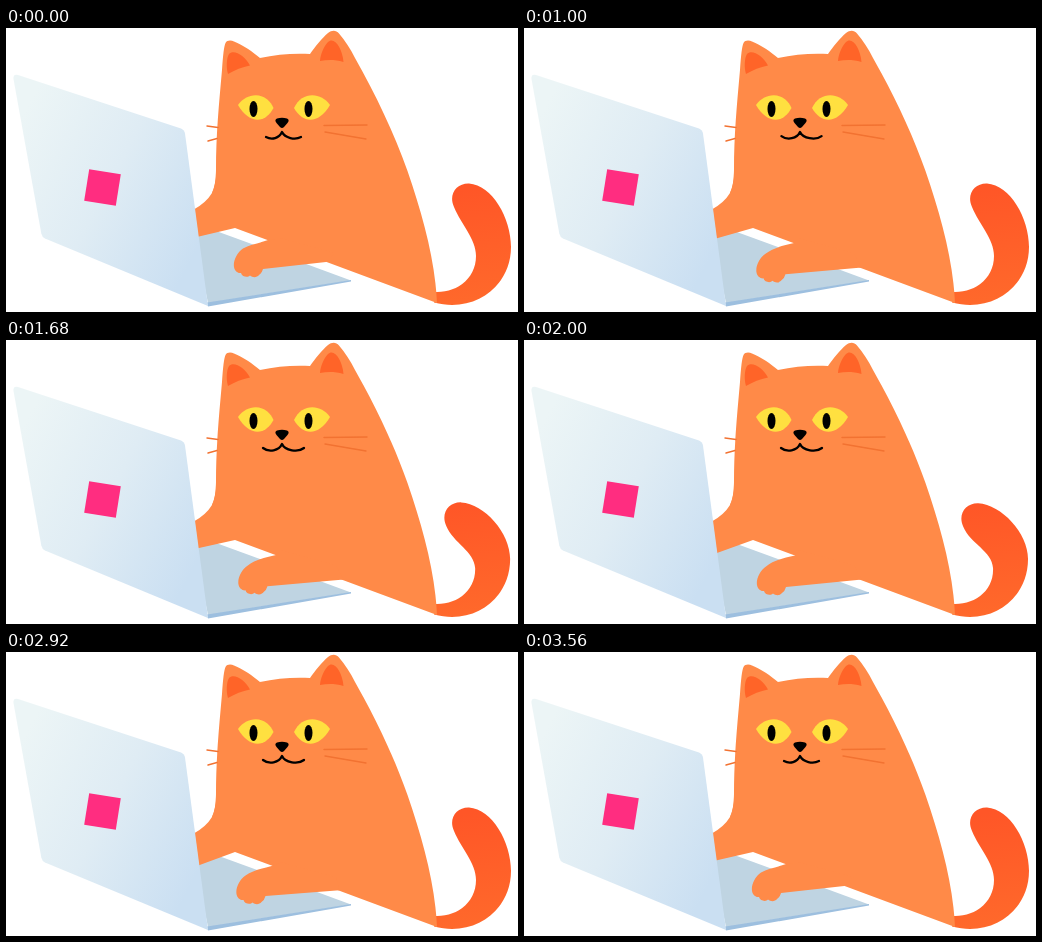
Write an HTML page that moves like this. It is 512 px wide and 284 px high and loops after 3.6 s.

```html
<!DOCTYPE html>
<html lang="en">
<head>
<meta charset="utf-8">
<title>Cat at a laptop</title>
<style>
  html, body { margin: 0; width: 100%; height: 100%; overflow: hidden; background: #fff; }
  svg { display: block; width: 100vw; height: 100vh; }
  .fur { fill: #ff8a48; }
  .ear { fill: #ff6428; }
  .eye { fill: #ffe040; }
  .line { fill: none; stroke-linecap: round; stroke-linejoin: round; }
</style>
</head>
<body>
<svg viewBox="0 0 512 284">
  <defs>
    <linearGradient id="lidFill" gradientUnits="userSpaceOnUse" x1="10" y1="100" x2="202" y2="200">
      <stop offset="0" stop-color="#ecf5f6"/>
      <stop offset=".5" stop-color="#dfecf4"/>
      <stop offset="1" stop-color="#cadff2"/>
    </linearGradient>
    <linearGradient id="tailFill" gradientUnits="userSpaceOnUse" x1="465" y1="160" x2="480" y2="275">
      <stop offset="0" stop-color="#ff5627"/>
      <stop offset="1" stop-color="#ff692b"/>
    </linearGradient>
  </defs>

  <path id="tail" fill="url(#tailFill)"/>

  <path class="fur" d="M210 142 C210 106 213 76 216 42 C217 27 218 18 219.500 15 C221 12 225 12 228 13.500
    C237 17 247 24 254 30 C270 26.500 288 25 304 26 C309 19 316 10 322 5 C326 2 330 2 333 5.500
    C339 12.500 344.500 21 349 30 C369.500 66 388.500 106 401.500 143 C416.500 187 429 231 431 275L229 200L205 190L206 165Q210 156 210 142Z"/>
  <path class="ear" d="M223 26 C228 21 239 28 244 37.500 C236 39 229 42 222 46 C220 39 220.500 30 223 26Z"/>
  <path class="ear" d="M322 14 C328 8 336.500 20 337.500 34 C329 31.500 322 31.500 314 33 C314.500 26 318 18 322 14Z"/>

  <g id="eyes">
    <path class="eye" d="M232 77 C241 64 260 63 267.500 80 C259 96 243 96 232 77Z"/>
    <path class="eye" d="M324 77 C315 64 296 63 288 80 C297 96 313 96 324 77Z"/>
    <ellipse cx="247.500" cy="81" rx="4" ry="8"/>
    <ellipse cx="302.500" cy="81" rx="4" ry="8"/>
  </g>
  <path d="M271 90.500 Q276 89 281 90.500 Q284 92 281.500 95 L278 99 Q276 101 274 99 L270.500 95 Q268 92 271 90.500Z"/>
  <path id="mouth" class="line" stroke="#000" stroke-width="2.300"/>
  <path class="line" stroke="#f27231" stroke-width="1.400"
    d="M318 97.500 L361 97 M319 104 L360 111 M201 98 L212 99.500 M202 113 L211 110.500"/>

  <path fill="#bfd4e2" d="M188 208 L206 201.500 L345 252.500 L202 275Z"/>
  <path fill="#9dbfdf" d="M201 274.500 L345 252 L345 253.500 L202 278.500Z"/>

  <path id="farArm" class="fur"/>
  <path id="nearArm" class="fur"/>

  <path fill="url(#lidFill)" d="M12 47 L175 100.500 Q178.500 102 179 105.500 L202 278 L39 210.500 Q36 209 35.300 205.500 L7.500 51 Q7 45.500 12 47Z"/>
  <rect x="80.500" y="143.500" width="32" height="32" fill="#ff2d80" transform="rotate(9 96.500 159.500)"/>
</svg>

<script>
  const LOOP = 3600, STEP = 40, TAP = 900;
  const nearKeys = [[0, 0], [560, 1], [1400, .8], [2000, 1], [2360, .8], [2920, .5], [3600, 0]];
  const tailKeys = [[0, 0], [1120, 0], [1400, .35], [1800, 1], [2000, .97], [2360, 0], [3600, 0]];
  const smileKeys = [[0, 0], [600, 0], [1120, 1], [2920, 1], [3400, 0], [3600, 0]];
  const squintKeys = [[0, 0], [400, 0], [560, 1], [720, 0], [3600, 0]];

  // Eased value between neighbouring [time, value] pairs.
  function ease(keys, t) {
    const i = keys.findIndex(k => k[0] > t);
    const [t0, a] = keys[i - 1], [t1, b] = keys[i];
    const u = (t - t0) / (t1 - t0);
    return a + (b - a) * u * u * (3 - 2 * u);
  }

  const setAttr = (id, name, value) => document.getElementById(id).setAttribute(name, value);
  const setPath = (id, d) => setAttr(id, "d", d);

  function tail(s) {
    const x = n => n - 9 * s, y = n => n + 8 * s;
    return `M428 264 L431 264 C453 264 470 249 ${470 - s} 228
      C${470 - 2 * s} 211 ${x(455)} ${y(196)} ${x(448)} ${y(179)}
      C${x(442)} ${y(166)} ${x(451)} ${y(155)} ${x(463)} ${y(155.5)}
      C${x(486)} ${y(157)} ${505 - s} ${190 + 3 * s} ${505 - s} 219
      C${505 - s} 258 469 285.5 428 274.5Z`;
  }

  function nearArm(p) {
    const x = n => n + 5 * p, y = n => n + 6 * p;
    const q = p * (2 - p);
    return `M${262 + 9 * p} ${212 + 3.4 * p} C${x(254)} ${215 + 3 * p} ${x(244)} ${216.5 + 4 * p} ${x(237)} ${y(220.5)}
      C${x(231)} ${y(224.5)} ${x(227)} ${y(233)} ${x(228)} ${y(239)}
      C${x(228.5)} ${y(243)} ${x(232)} ${y(245.5)} ${x(235)} ${y(245)}
      C${x(236)} ${y(249)} ${x(242)} ${y(250)} ${x(244)} ${y(247.5)}
      C${x(247)} ${y(250)} ${x(251)} ${y(249.5)} ${x(253)} ${y(247)}
      Q${x(256)} ${y(245)} ${x(257)} ${y(241)}
      L${320 + 18 * q} ${234 + 5.5 * q} L330 225 L275 210Z`;
  }

  const farArm = q => `M210 145 Q210 157 206 165 Q200 175 187 182 L186 ${210 + 6 * q}
    L193 ${208 + 6 * q} L229 200 L240 190Z`;

  function mouth(s) {
    const l = 260 - 3 * s, r = 295 + 3 * s, y = 109 - s, low = 112.2 + .5 * s;
    return `M${l} ${y} C${l + 6} ${low} 273 ${low - 2} 276 104 C279 ${low - 2} ${r - 6} ${low} ${r} ${y}`;
  }

  function draw(now) {
    const t = Math.floor(now % LOOP / STEP) * STEP;
    const tap = .5 + .5 * Math.cos(2 * Math.PI * (t / TAP - .32));
    const open = 1 - .14 * ease(squintKeys, t);
    setPath("tail", tail(ease(tailKeys, t)));
    setPath("nearArm", nearArm(ease(nearKeys, t)));
    setPath("farArm", farArm(tap * tap));
    setPath("mouth", mouth(ease(smileKeys, t)));
    setAttr("eyes", "transform", `translate(0 80) scale(1 ${open}) translate(0 -80)`);
  }

  const start = performance.now();
  function tick() {
    draw(performance.now() - start);
    requestAnimationFrame(tick);
  }
  tick();
</script>
</body>
</html>
```
